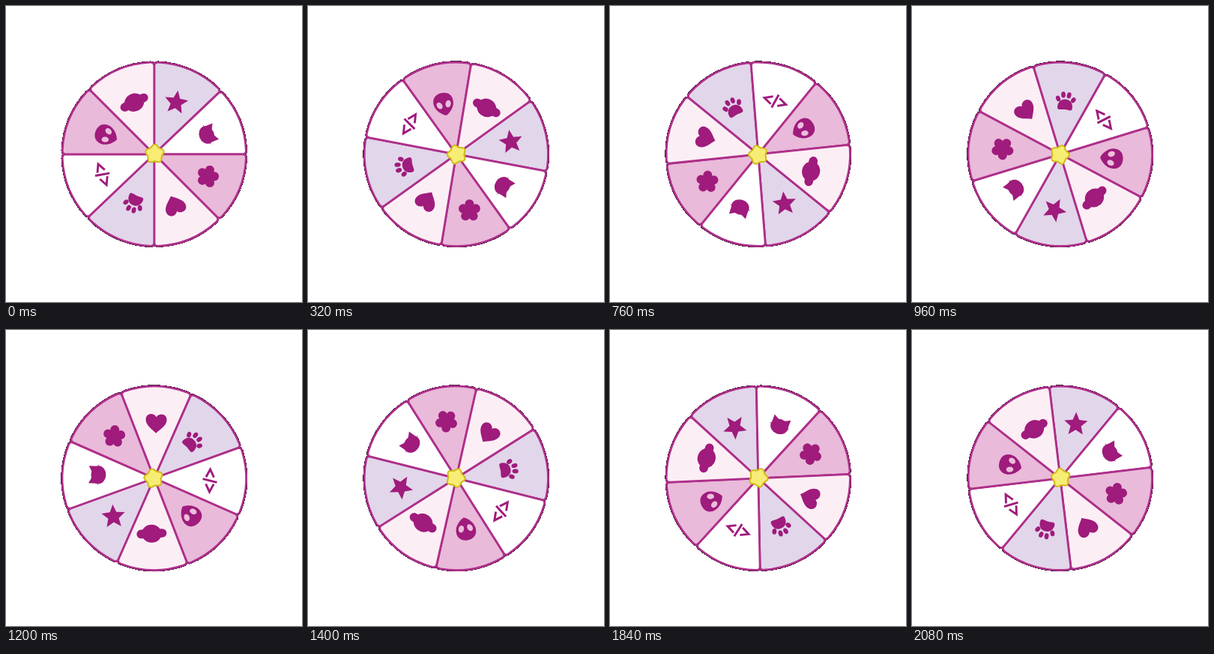
Animation, 395 px wide and 395 px high, one loop 2120 ms. Source, as an HTML page:

```html
<!DOCTYPE html>
<html lang="en">
<head>
<meta charset="utf-8">
<title>Spinning wheel</title>
<style>
  html, body { margin: 0; width: 100%; height: 100%; overflow: hidden; background: #fff; }
  svg { display: block; width: 100vw; height: 100vh; }
  .sector { stroke: #ae2f8a; stroke-width: 2.8; stroke-linejoin: round; }
  .edge { fill: none; stroke: #1c0a18; stroke-width: 3.5; shape-rendering: crispEdges; }
  .icon { fill: #9f1b7c; }
  .line { fill: none; stroke: #9f1b7c; stroke-width: 2.9; }
  .hub { stroke-linejoin: round; }
</style>
</head>
<body>
<svg viewBox="0 0 395 395"><g id="wheel"></g></svg>
<script>
const LOOP = 2120, STEP = 40, R = 122.7, CENTER = 197.8;
const wheel = document.getElementById('wheel');

// Angles are in degrees, clockwise from the top.
const polar = (r, deg) => {
  const a = deg * Math.PI / 180;
  return `${(r * Math.sin(a)).toFixed(2)} ${(-r * Math.cos(a)).toFixed(2)}`;
};

const star = (outer, inner, turn = 0) =>
  Array.from({ length: 10 }, (_, i) => polar(i % 2 ? inner : outer, turn + i * 36)).join(' ');

const ellipse = (x, y, rx, ry, turn = 0, more = '') =>
  `<ellipse rx="${rx}" ry="${ry}" transform="translate(${x} ${y}) rotate(${turn})" ${more}/>`;

// A wedge with rounded outer corners.
function sectorPath(from, to) {
  const inset = 2.4, inner = R - 5;
  return `M0 0L${polar(inner, from)}Q${polar(R, from)} ${polar(R, from + inset)}` +
    `A${R} ${R} 0 0 1 ${polar(R, to - inset)}Q${polar(R, to)} ${polar(inner, to)}Z`;
}

const petals = Array.from({ length: 5 }, (_, i) => {
  const [x, y] = polar(8.9, i * 72 - 22.8).split(' ');
  return ellipse(x, y, 6, 6);
}).join('');

const icons = {
  star: `<polygon points="${star(16.4, 7.4, -14.5)}"/>`,
  cat: ellipse(0, 1.5, 12, 10) +
    '<path d="M-11.5 0L-11.5-11.5L-4-7.5H4L11.5-11.5L11.5 0Z"/>' +
    '<path d="M-13.5 1H13.5" stroke="#9f1b7c" stroke-width=".8"/>',
  flower: petals + ellipse(0, 0, 6, 6),
  heart: '<path d="M0 13C-5 8-14 3-14-5C-14-13-4-15 0-8.5C4-15 14-13 14-5C14 3 5 8 0 13Z"/>',
  paw: '<path d="M-10 8C-10 1-6-3 0-3S10 1 10 8C10 13 5 10.5 0 10.5S-10 13-10 8Z"/>' +
    ellipse(-10.2, -3, 2.9, 3.9, -28) + ellipse(-3.8, -8.8, 2.9, 4.1, -8) +
    ellipse(3.8, -8.8, 2.9, 4.1, 8) + ellipse(10.2, -3, 2.9, 3.9, 28),
  code: '<path class="line" d="M-4.5-5.3L-15 0L-4.5 5.3M2-9.5L-2 9.5M4.5-5.3L15 0L4.5 5.3"/>',
  alien: '<path d="M0 15.5C-6 13-13.3 6-13.3-2.5C-13.3-11-7.5-15 0-15S13.3-11 13.3-2.5C13.3 6 6 13 0 15.5Z"/>' +
    ellipse(-5.9, 1, 3.6, 4.8, -22, 'fill="#ebbedb"') +
    ellipse(5.9, 1, 3.6, 4.8, 22, 'fill="#ebbedb"'),
  planet: ellipse(0, 0, 13.2, 12) +
    '<rect x="-20" y="-5.8" width="40" height="11.6" rx="6" transform="rotate(-4)"/>'
};

const bounds = [0, 46.4, 90, 135, 180, 226.4, 270, 315, 360];
const fills = ['#e2d6ea', '#fff', '#e9bad9', '#fceef5'];

// Icon, sideways shift, distance from the hub.
const places = [
  ['star', -.3, 74.8], ['cat', 2, 76], ['flower', 0, 77.3], ['heart', 1, 73.2],
  ['paw', -.6, 70.6], ['code', .6, 74.3], ['alien', -1, 69], ['planet', 1.8, 74]
];

const paths = places.map((_, i) => sectorPath(bounds[i], bounds[i + 1]));
const hub = star(9.2, 6.2);

wheel.innerHTML =
  paths.map(d => `<path class="edge" d="${d}"/>`).join('') +
  paths.map((d, i) => `<path class="sector" d="${d}" fill="${fills[i % 4]}"/>`).join('') +
  places.map(([name, x, r], i) => {
    const middle = (bounds[i] + bounds[i + 1]) / 2;
    return `<g class="icon" transform="rotate(${middle}) translate(${x} ${-r})">${icons[name]}</g>`;
  }).join('') +
  `<g class="hub" transform="translate(.7 -.4)">
    <polygon points="${hub}" stroke="#cdbb18" stroke-width="9"/>
    <polygon points="${hub}" fill="#f7ec74" stroke="#f7ec74" stroke-width="5"/>
  </g>`;

const start = performance.now();
function draw(now) {
  const t = Math.max(0, now - start) % LOOP;
  const angle = Math.floor(t / STEP) * STEP / LOOP * 360;
  wheel.setAttribute('transform', `translate(${CENTER} ${CENTER}) rotate(${angle})`);
  requestAnimationFrame(draw);
}
draw(start);
</script>
</body>
</html>
```
